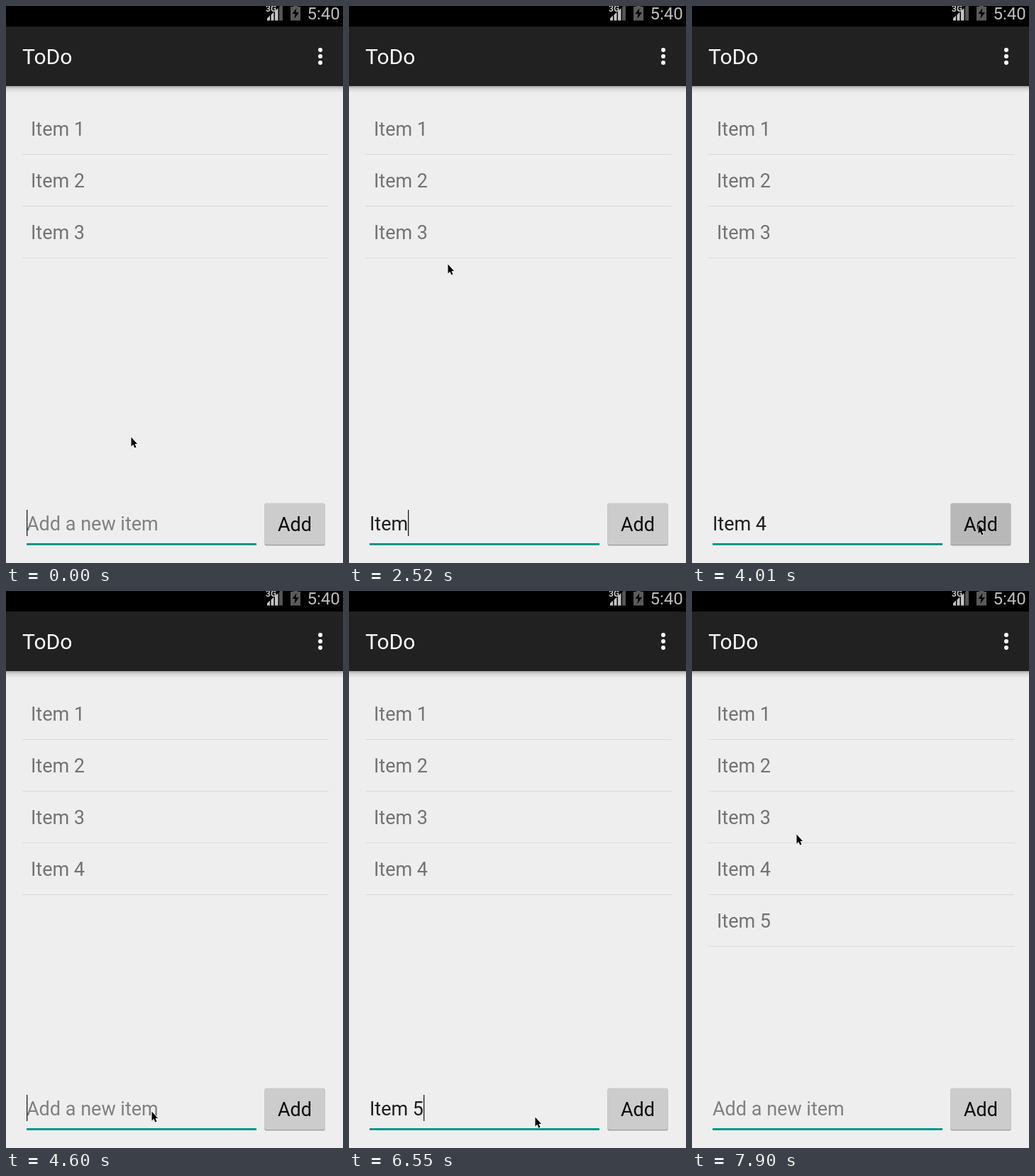
Recreate the animation shown at these times as an HTML page. Size 475 by 786 pixels, loop 8000 ms.

```html
<!DOCTYPE html>
<html lang="en">
<head>
<meta charset="utf-8">
<title>To-do list</title>
<style>
  html, body { margin: 0; width: 100%; height: 100%; overflow: hidden; background: #eee; }
  svg { display: block; width: 475px; height: 786px; }
  text { font: 27px Roboto, sans-serif; white-space: pre; }
  .row text { fill: #737373; }
  .row rect { fill: #dadada; }
</style>
</head>
<body>
<svg viewBox="0 0 475 786">
  <defs>
    <linearGradient id="shade" x2="0" y2="1">
      <stop offset="0" stop-color="#000" stop-opacity=".3"/>
      <stop offset=".4" stop-color="#000" stop-opacity=".09"/>
      <stop offset="1" stop-color="#000" stop-opacity="0"/>
    </linearGradient>
  </defs>
  <rect width="475" height="786" fill="#eee"/>

  <!-- status bar -->
  <rect width="475" height="29"/>
  <text x="366" y="8" fill="#c8c8c8" style="font-size:12px;font-weight:700">3G</text>
  <path d="M368 20.5v-3l4-4v7zM373.5 20.5v-8l4-4v12zM379 20.5v-13l4.500-4.500v17.500z" fill="#c4c4c4"/>
  <path d="M385 20.500V1.500l5-5v24z" fill="#555"/>
  <path d="M401 20.500V1h4v-2h6v2h4v19.500z" fill="#5a5a5a"/>
  <path d="M409.500 3l-6 8h4l-1 7 6.500-9h-4.500z"/>
  <text x="424.500" y="19" fill="#bdbdbd" style="font-size:24px">5:40</text>

  <!-- action bar -->
  <rect y="113" width="475" height="10" fill="url(#shade)"/>
  <rect y="29" width="475" height="84" fill="#212121"/>
  <text x="23" y="82" fill="#fff" style="font-size:30px">ToDo</text>
  <g fill="#fff">
    <circle cx="443" cy="62" r="3"/><circle cx="443" cy="71" r="3"/><circle cx="443" cy="80" r="3"/>
  </g>

  <g id="list"></g>

  <!-- input -->
  <text id="field" x="29" y="740"></text>
  <rect id="caret" y="711" width="1.300" height="37" fill="#1c1c1c"/>
  <rect x="29" y="758" width="324" height="3" fill="#009688"/>

  <!-- button -->
  <rect x="364.500" y="702" width="85" height="59.500" rx="2" fill="#a2a2a2"/>
  <rect id="button" x="365" y="701.500" width="84" height="58.500" rx="2"/>
  <text x="407" y="741" text-anchor="middle" fill="#0c0c0c">Add</text>

  <path id="pointer" d="M.5 .5V13.500L3.300 10.800 5.300 15.500 7.500 14.600 5.500 10H9z"
        stroke="#fff" stroke-width="1" paint-order="stroke"/>
</svg>
<script>
const LOOP = 8000;
const $ = id => document.getElementById(id);

// Each track holds [start time, value...]; values hold until the next step.
const pointerTrack = [
  [0, 176, 608], [890, 167, 530], [1040, 149, 405], [1180, 142, 354], [1330, 139, 364],
  [2960, 245, 535], [3110, 302, 604], [3260, 362, 685], [3410, 394, 722], [3560, 403, 731],
  [4450, 335, 734], [4600, 205, 734], [4750, 169, 734],
  [6550, 262, 742], [6700, 395, 754], [6850, 420, 747],
  [7600, 335, 600], [7750, 205, 425], [7900, 147, 343]
];
const textTrack = [
  [0, ''], [2220, 'I'], [2370, 'Ite'], [2520, 'Item'], [2670, 'Item '], [3110, 'Item 4'],
  [4150, ''], [5650, 'I'], [5800, 'Ite'], [5950, 'Item'], [6100, 'Item '], [6550, 'Item 5'],
  [7300, '']
];
const caretTrack = [
  [0, 1], [290, 0], [890, 1], [1480, 0], [1930, 1], [3710, 0],
  [4150, 1], [4750, 0], [5200, 1], [7150, 0], [7300, 1], [7900, 0]
];
const countTrack = [[0, 3], [4150, 4], [7300, 5]];
const pressTrack = [[0, 0], [4010, 1], [4150, 0]];

const at = (track, t) => track.findLast(step => step[0] <= t).slice(1);

$('list').innerHTML = [0, 1, 2, 3, 4].map(i => `<g class="row">
  <text x="35" y="${183 + 73 * i}">Item ${i + 1}</text>
  <rect x="23" y="${209 + 73 * i}" width="432" height="1"/></g>`).join('');
const rows = [...$('list').children];

function draw(t) {
  const [x, y] = at(pointerTrack, t);
  const [text] = at(textTrack, t);
  const [count] = at(countTrack, t);
  const field = $('field');

  field.textContent = text;
  const width = text ? field.getComputedTextLength() : 0;
  field.textContent = text || 'Add a new item';
  field.setAttribute('fill', text ? '#1f1f1f' : '#808080');

  $('caret').setAttribute('x', Math.floor(29 + width));
  $('caret').setAttribute('opacity', at(caretTrack, t)[0]);
  $('button').setAttribute('fill', at(pressTrack, t)[0] ? '#b8b8b9' : '#ccc');
  $('pointer').setAttribute('transform', `translate(${x} ${y})`);
  rows.forEach((row, i) => row.setAttribute('visibility', i < count ? 'visible' : 'hidden'));
}

const start = performance.now();
function tick() {
  draw((performance.now() - start) % LOOP);
  requestAnimationFrame(tick);
}
tick();
</script>
</body>
</html>
```
